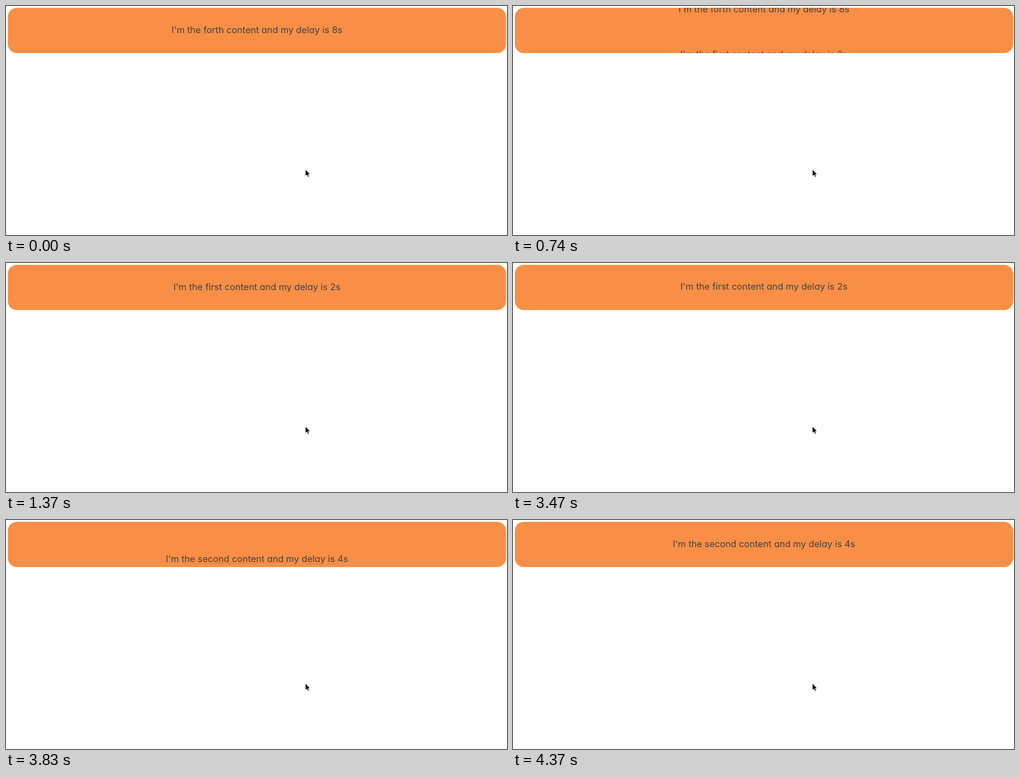
Recreate the animation shown at these times as an HTML page. Size 1102x506 px, loop 8000 ms.

```html
<!DOCTYPE html>
<html lang="en">
<head>
<meta charset="utf-8">
<title>Text ticker</title>
<style>
  html, body { margin: 0; width: 100%; height: 100%; overflow: hidden; background: #fefefe; }
  svg { display: block; }
  text {
    font: 400 20px Inter, "Open Sans", sans-serif;
    font-feature-settings: "cv11"; /* single-storey a */
    font-optical-sizing: none;
    text-anchor: middle;
    fill: #424242;
  }
</style>
</head>
<body>
<svg width="1102" height="506" viewBox="0 0 1102 506">
  <rect x="4" y="4" width="1096" height="100" rx="20" fill="#f98f46"/>
  <svg y="4" width="1102" height="100" overflow="hidden">
    <g id="lines">
      <text x="552" y="56">I'm the forth content and my delay is 8s</text>
      <text x="552" y="156">I'm the first content and my delay is 2s</text>
      <text x="552" y="256">I'm the second content and my delay is 4s</text>
    </g>
  </svg>
  <g transform="translate(658.5 361)">
    <path d="M0 1V16L3.5 13L6 18.5L9 17L7 12H11Z" fill="#000" opacity=".15"/>
    <path d="M0 0V15L3.5 12L5.8 17L8.3 16L6.2 11H10.6Z" fill="#000" stroke="#fff" stroke-linejoin="round"/>
  </g>
</svg>
<script>
const LOOP = 8000, SLIDE = 1000, ROW = 100;
const slides = [
  { start: 466, ticks: [500, 650, 740, 830, 930, 1020, 1110, 1200, 1290, 1370] },
  { start: 3436, ticks: Array.from({ length: 11 }, (_, i) => 3470 + 90 * i) },
];
const lines = document.getElementById("lines");

const bezier = (a, b, s) => 3 * a * s * (1 - s) ** 2 + 3 * b * s * s * (1 - s) + s ** 3;

// CSS "ease", settling once less than a pixel is left
function ease(p) {
  if (p > 0.9) return 1;
  let low = 0, high = 1;
  for (let i = 0; i < 24; i++) {
    const mid = (low + high) / 2;
    if (bezier(0.25, 0.25, mid) < p) low = mid; else high = mid;
  }
  return bezier(0.1, 1, low);
}

// The picture moves only on the ticks and holds in between
function moved({ start, ticks }, time) {
  const tick = ticks.filter(t => t <= time).pop();
  return tick === undefined ? 0 : Math.floor(ROW * ease((tick - start) / SLIDE));
}

function draw(now) {
  const time = now % LOOP;
  const scroll = slides.reduce((sum, slide) => sum + moved(slide, time), 0);
  lines.setAttribute("transform", `translate(0 ${-scroll})`);
}

const origin = performance.now();
function frame() {
  draw(performance.now() - origin);
  requestAnimationFrame(frame);
}
frame();
</script>
</body>
</html>
```
